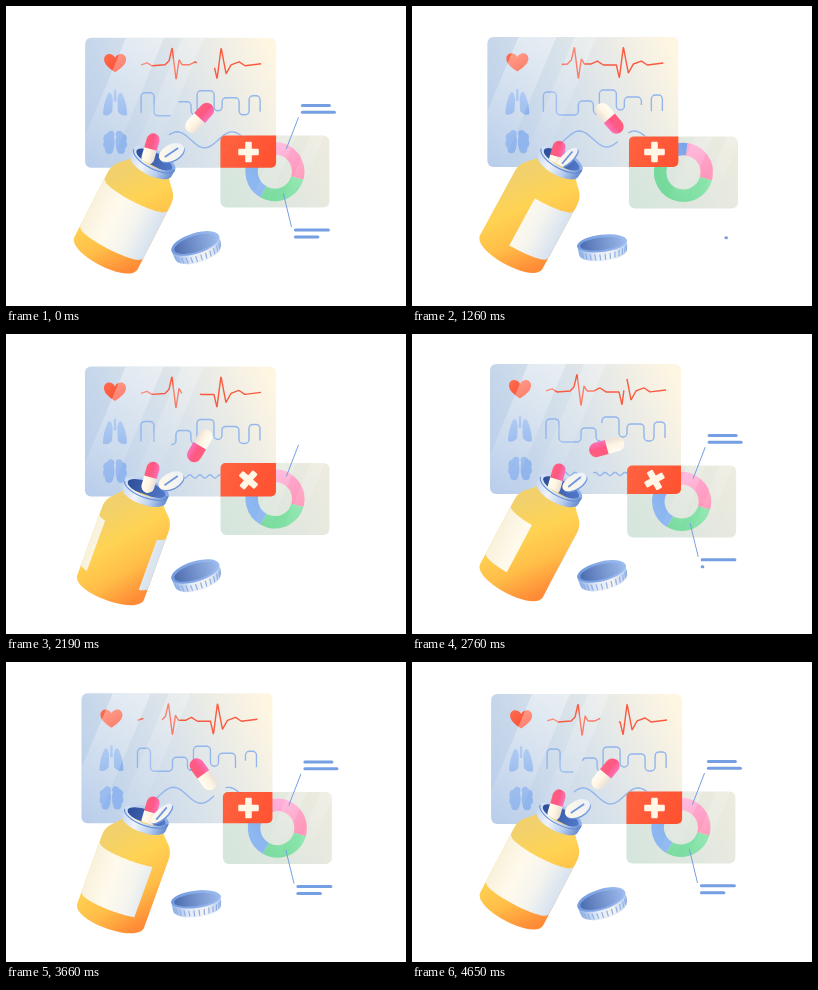
An HTML page with a canvas for the animation above (4680 ms loop, 400 by 300 pixels).

```html
<!DOCTYPE html>
<html lang="en">
<head>
<meta charset="utf-8">
<style>
html, body { margin: 0; width: 100%; height: 100%; overflow: hidden; background: #fff; }
canvas { display: block; width: 400px; height: 300px; }
</style>
</head>
<body>
<canvas id="stage"></canvas>
<script>
const LOOP = 4680, HALF = LOOP / 2, TAU = Math.PI * 2, DEG = Math.PI / 180;
const canvas = document.getElementById('stage');
const ctx = canvas.getContext('2d');
const dpr = window.devicePixelRatio || 1;
canvas.width = 400 * dpr;
canvas.height = 300 * dpr;

const clamp = v => Math.max(0, Math.min(1, v));
const ramp = (t, a, b) => clamp((t - a) / (b - a));
const ease = p => (1 - Math.cos(Math.PI * p)) / 2;

// Linear interpolation through [time, value] pairs.
function keys(t, list) {
  let [t0, v0] = list[0];
  for (const [t1, v1] of list) {
    if (t < t1) return t <= t0 ? v0 : v0 + (v1 - v0) * (t - t0) / (t1 - t0);
    t0 = t1; v0 = v1;
  }
  return v0;
}

function grad(x0, y0, x1, y1, ...colors) {
  const g = ctx.createLinearGradient(x0, y0, x1, y1);
  colors.forEach((c, i) => g.addColorStop(i / (colors.length - 1), c));
  return g;
}

function at(x, y, angle, draw) {
  ctx.save();
  ctx.translate(x, y);
  ctx.rotate(angle * DEG);
  draw();
  ctx.restore();
}

function fill(style, build) {
  ctx.beginPath();
  build();
  ctx.fillStyle = style;
  ctx.fill();
}

const oval = (x, y, rx, ry, style) =>
  fill(style, () => ctx.ellipse(x, y, rx, ry, 0, 0, TAU));
const box = (x, y, w, h, r, style) => fill(style, () => ctx.roundRect(x, y, w, h, r));

// Slanted light bands that fade downwards.
function shine(w, h, bands) {
  ctx.save();
  ctx.beginPath();
  ctx.roundRect(0, 0, w, h, 6);
  ctx.clip();
  for (const [x, bw, alpha] of bands) {
    fill(grad(0, 0, 0, h, `rgba(255,255,255,${alpha})`, 'rgba(255,255,255,0)'), () => {
      ctx.moveTo(x, 0);
      ctx.lineTo(x + bw, 0);
      ctx.lineTo(x + bw - h * .42, h);
      ctx.lineTo(x - h * .42, h);
    });
  }
  ctx.restore();
}

const ecg = [[56,27],[62,25],[67,28],[80,27],[84,23],[87,10],[91,42],[94,22],[97,27],
  [104,27],[110,24],[116,28],[129,28],[132,41],[136,10],[141,36],[146,27],[154,24],[160,28],[176,26]];
const breath = [[56,75],[56,55],[69,55],[69,78],[91,78],[91,64],[106,64],[106,77],[112,77],
  [112,53],[129,53],[129,73],[137,73],[137,60],[154,60],[154,77],[164,77],[164,58],[175,58],[175,74]];

// Broad waves give way to a fine ripple in the middle of the loop.
function brainWave(t) {
  const k = ease(ramp(t, 1450, 2000)) - ease(ramp(t, 2950, 3500));
  return Array.from({ length: 54 }, (_, i) => {
    const x = 70 + i * 2;
    const broad = 102 - 8 * Math.cos((x - 92) / 55 * TAU);
    const fine = 110 + 1.8 * Math.cos(x / 10 * TAU);
    return [x, broad + (fine - broad) * k];
  });
}

// A trace with one gap that travels along its length.
function trace(pts, color, radius, gap, phase) {
  let len = 0;
  for (let i = 1; i < pts.length; i++)
    len += Math.hypot(pts[i][0] - pts[i - 1][0], pts[i][1] - pts[i - 1][1]);
  len -= radius * .43 * (pts.length - 2);
  ctx.save();
  ctx.beginPath();
  ctx.moveTo(...pts[0]);
  for (let i = 1; i < pts.length - 1; i++) ctx.arcTo(...pts[i], ...pts[i + 1], radius);
  ctx.lineTo(...pts[pts.length - 1]);
  ctx.setLineDash([len - gap, gap]);
  ctx.lineDashOffset = -(len * (phase % 1) + gap);
  ctx.strokeStyle = color;
  ctx.lineWidth = 1.4;
  ctx.lineJoin = 'round';
  ctx.stroke();
  ctx.restore();
}

function heart() {
  fill(grad(-8, -8, 8, 9, '#ff6a4c', '#f9472d'), () => {
    ctx.moveTo(0, 9.5);
    ctx.bezierCurveTo(-7, 5, -11, 1, -11, -3.5);
    ctx.bezierCurveTo(-11, -9.5, -3, -11, 0, -5);
    ctx.bezierCurveTo(3, -11, 11, -9.5, 11, -3.5);
    ctx.bezierCurveTo(11, 1, 7, 5, 0, 9.5);
  });
}

function lungs() {
  const blue = grad(0, -13, 0, 13, '#9abdf1', '#8bb1eb');
  box(-1.2, -13, 2.4, 12, 1, blue);
  for (const side of [-1, 1]) {
    ctx.save();
    ctx.scale(side, 1);
    fill(blue, () => {
      ctx.moveTo(2.3, -3);
      ctx.bezierCurveTo(3, -11, 6, -12, 8, -7);
      ctx.bezierCurveTo(10.5, -1, 12, 5, 12, 12);
      ctx.bezierCurveTo(9, 14, 5, 12, 2.8, 9);
    });
    ctx.restore();
  }
}

function brain() {
  const blue = '#91b5ed';
  for (const side of [-1, 1]) {
    oval(side * 5.5, 0, 5, 11, blue);
    oval(side * 4, -8.5, 3.3, 3.6, blue);
    oval(side * 7.8, -4.5, 3.8, 4.4, blue);
    oval(side * 8.2, 1.5, 3.7, 4.4, blue);
    oval(side * 6, 7, 4, 4.2, blue);
  }
}

function chartPanel(t, x, y, sway) {
  at(x, y, 0, () => {
    box(0, 0, 191, 130, 6, grad(0, 110, 191, 25, '#b9ceeb', '#d8e2ea', '#fff6e2'));
    at(30, 25, 0, heart);
    at(30, 65, 0, lungs);
    at(30, 105, 0, brain);
    const p = t / HALF;
    trace(ecg, '#fa5a40', .15, 20, p + .46);
    trace(breath, '#93b6ed', 4, 18, p + .25);
    trace(brainWave(t), '#93b6ed', 0, 14, p + .03);
    shine(191, 130, [[36 + sway * 5, 38, .4], [92 + sway * 5, 22, .28]]);
  });
}

function ring(t) {
  const k = keys(t, [[700, 0], [1260, 1], [1900, 0]]);
  const top = -105 + 23 * k, end = 120 + 80 * k;
  const parts = [
    [top, 16, grad(0, -30, 26, 10, '#ffb0dc', '#ff94b4')],
    [16, end, grad(-20, 20, 25, 5, '#74d99a', '#8be5ad')],
    [end, 360 + top, grad(-30, 0, 0, -28, '#8db7f0', '#7ea5e9')]
  ];
  ctx.lineWidth = 12.5;
  for (const [a, b, color] of parts) {
    ctx.beginPath();
    ctx.arc(0, 0, 23.3, a * DEG, b * DEG);
    ctx.strokeStyle = color;
    ctx.stroke();
  }
}

// x0, y0, x1, y1, width, hide start, hide end, show start, show end
const callouts = [
  [66, 13, 78, -18, 1, 680, 850, 1950, 2200],
  [82, -30, 109, -30, 3, 800, 1000, 2200, 2500],
  [82, -23.3, 114, -23.3, 3, 850, 1100, 2300, 2600],
  [63, 58, 71, 91, 1, 800, 950, 2250, 2500],
  [75, 94.3, 108, 94.3, 3, 900, 1150, 2450, 2780],
  [75, 101.3, 97.5, 101.3, 3, 1000, 1290, 2730, 3000]
];

function drawCallouts(t) {
  ctx.strokeStyle = '#759fe2';
  ctx.lineCap = 'round';
  for (const [x0, y0, x1, y1, w, h0, h1, s0, s1] of callouts) {
    const shown = t >= s0;
    const from = shown ? 0 : ease(ramp(t, h0, h1));
    const to = shown ? ease(ramp(t, s0, s1)) : 1;
    if (from >= to) continue;
    ctx.lineWidth = w;
    ctx.beginPath();
    ctx.moveTo(x0 + (x1 - x0) * from, y0 + (y1 - y0) * from);
    ctx.lineTo(x0 + (x1 - x0) * to, y0 + (y1 - y0) * to);
    ctx.stroke();
  }
  ctx.lineCap = 'butt';
}

function ringPanel(x, y, t, sway) {
  at(x, y, 0, () => {
    box(0, 0, 109, 72, 6, grad(0, 60, 109, 10, '#d5e6dd', '#e0e7df', '#eeebdf'));
    at(54.5, 36, 0, () => ring(t));
    shine(109, 72, [[62 - sway * 4, 18, .2], [94 - sway * 4, 14, .2]]);
  });
}

function redBadge(bx, by, sx, sy, t) {
  box(sx, sy, bx + 191 - sx, by + 130 - sy, [5, 0, 5, 0], grad(sx, sy, sx + 50, sy + 30, '#ff6341', '#ff5231'));
  at(242.5, 146, 180 * ease(ramp(t, 1760, 3120)), () => {
    box(-10.3, -3.3, 20.6, 6.6, 1.2, '#fff6e6');
    box(-3.3, -10.3, 6.6, 20.6, 1.2, '#fff6e6');
  });
}

function capsule(x, y, angle, len, w) {
  at(x, y, angle, () => {
    const r = w / 2;
    box(-len / 2, -r, len / 2 + .3, w, [r, 0, 0, r], grad(0, -r, 0, r, '#fffdf3', '#fff5e2', '#e9dfd8'));
    box(0, -r, len / 2, w, [0, r, r, 0], grad(0, -r, 0, r, '#ff5f7c', '#ff5885', '#fb73b8'));
  });
}

function tablet(sway) {
  const k = 1 - sway;
  at(165.5 - 5.2 * k, 146.5 + 2.6 * k, -27 - 8 * k, () => {
    const ry = 8 - 1.5 * k;
    oval(0, 1.5, 13.5, ry, '#6f96dc');
    oval(0, 0, 13.5, ry, grad(-12, 0, 12, 0, '#fff9ea', '#eef1f6'));
    ctx.strokeStyle = '#6f95dc';
    ctx.lineWidth = 1.8;
    ctx.beginPath();
    ctx.moveTo(-8, 1);
    ctx.lineTo(8, -1);
    ctx.stroke();
  });
}

function cap(sway) {
  at(190.5, 241.3, -12 - 5.5 * sway, () => {
    const rx = 25, ry = 9.5 + sway * .8;
    fill(grad(-rx, 0, rx, 0, '#8fb0e8', '#e4ecf7', '#f3f3f2', '#b3cbf0'), () => {
      ctx.moveTo(-rx, -5);
      ctx.lineTo(-rx + 1, 6);
      ctx.ellipse(0, 5, rx - 1, ry, 0, Math.PI, 0, true);
      ctx.lineTo(rx, -5);
    });
    ctx.strokeStyle = '#8fafe3';
    ctx.lineWidth = 1.2;
    for (let a = 14; a < 170; a += 12) {
      const c = Math.cos(a * DEG), s = Math.sin(a * DEG);
      ctx.beginPath();
      ctx.moveTo(rx * c, -2 + ry * s);
      ctx.lineTo((rx - 1) * c, 4 + ry * s);
      ctx.stroke();
    }
    oval(0, -4, rx, ry, grad(-rx, 0, rx, 0, '#7199df', '#9ebdf0'));
    oval(0, -3.6, rx - 3, ry - 2.4, grad(-rx, 0, rx, 0, '#4766ab', '#7493cd', '#9dbbed'));
  });
}

const BODY = 35.5, RIM = -66;

function label(x0, x1) {
  const arc = x => 7 * Math.sqrt(Math.max(0, 1 - (x / BODY) ** 2));
  const n = 20, step = (x1 - x0) / n;
  fill(grad(-BODY, 0, BODY, 0, '#f8f1dc', '#fffaec', '#f4f4ef', '#d6e2f0'), () => {
    for (let i = 0; i <= n; i++) ctx.lineTo(x0 + i * step, -26 + arc(x0 + i * step));
    for (let i = n; i >= 0; i--) ctx.lineTo(x0 + i * step, 27.5 + arc(x0 + i * step));
  });
}

function bottle(t, sway) {
  const swing = Math.cos((t - 1350) / (LOOP / 3) * TAU);
  const pose = draw => at(118, 214 - 2.7 * swing, 24.3 + 4.5 * swing, draw);
  const edge = a => BODY * Math.sin(Math.max(-90, Math.min(90, a)) * DEG);

  pose(() => {
    oval(0, RIM, 23.5, 9.5, grad(-24, 0, 24, 0, '#d5e2f6', '#86a8e4'));
    oval(0, RIM, 20, 7, grad(-20, 0, 20, 0, '#2f4d98', '#5279c8'));
  });
  capsule(144.5, 143 + 3.7 * (1 - sway), -74, 32, 13);
  tablet(sway);
  pose(() => {
    fill(grad(-BODY, -24, BODY, 34, '#f2d16c', '#ffd353', '#ffbe48', '#ff8b36'), () => {
      ctx.moveTo(-20, RIM + 6);
      ctx.bezierCurveTo(-24, -49, -BODY, -48, -BODY, -33);
      ctx.lineTo(-BODY, 40);
      ctx.bezierCurveTo(-33, 57, 33, 57, BODY, 40);
      ctx.lineTo(BODY, -33);
      ctx.bezierCurveTo(BODY, -48, 24, -49, 20, RIM + 6);
    });
    const left = edge(keys(t, [[0, -95], [660, -42], [1260, -8], [2190, 50], [3000, 95]]));
    const right = edge(keys(t, [[1600, -95], [2190, -52], [2760, -13], [3660, 40], [4560, 95]]));
    if (left < BODY) label(left, BODY);
    if (right > -BODY) label(-BODY, right);
    fill(grad(-24, 0, 24, 0, '#c7d9f5', '#f0f4fa', '#b8ceef', '#5f86cd'), () => {
      ctx.moveTo(-23.5, RIM);
      ctx.lineTo(-23, RIM + 7);
      ctx.ellipse(0, RIM + 7, 23, 9.5, 0, Math.PI, 0, true);
      ctx.lineTo(23.5, RIM);
      ctx.lineTo(20, RIM);
      ctx.ellipse(0, RIM, 20, 7, 0, 0, Math.PI);
    });
    ctx.strokeStyle = '#6089d2';
    ctx.lineWidth = 1;
    ctx.beginPath();
    ctx.ellipse(0, RIM, 23, 9.2, 0, 0, Math.PI);
    ctx.stroke();
  });
}

function render(t) {
  const turn = t / HALF * TAU;
  const sway = Math.cos(turn), bob = Math.sin(turn - 20 * DEG);
  const bx = 77.2 + 1.9 * sway, by = 31.2 - 1.8 * bob;
  const sx = 215.7 - 1.3 * sway, sy = 130.2 + 1.8 * bob;

  ctx.setTransform(dpr, 0, 0, dpr, 0, 0);
  ctx.clearRect(0, 0, 400, 300);
  chartPanel(t, bx, by, sway);
  ringPanel(sx, sy, t, sway);
  redBadge(bx, by, sx, sy, t);
  at(sx, sy, 0, () => drawCallouts(t));
  capsule(195.5 - 1.9 * sway, 112.3 + .9 * bob, -48 + 360 * t / LOOP, 36, 14.6);
  cap(sway);
  bottle(t, sway);
}

const start = performance.now();
function tick() {
  render((performance.now() - start) % LOOP);
  requestAnimationFrame(tick);
}
tick();
</script>
</body>
</html>
```
